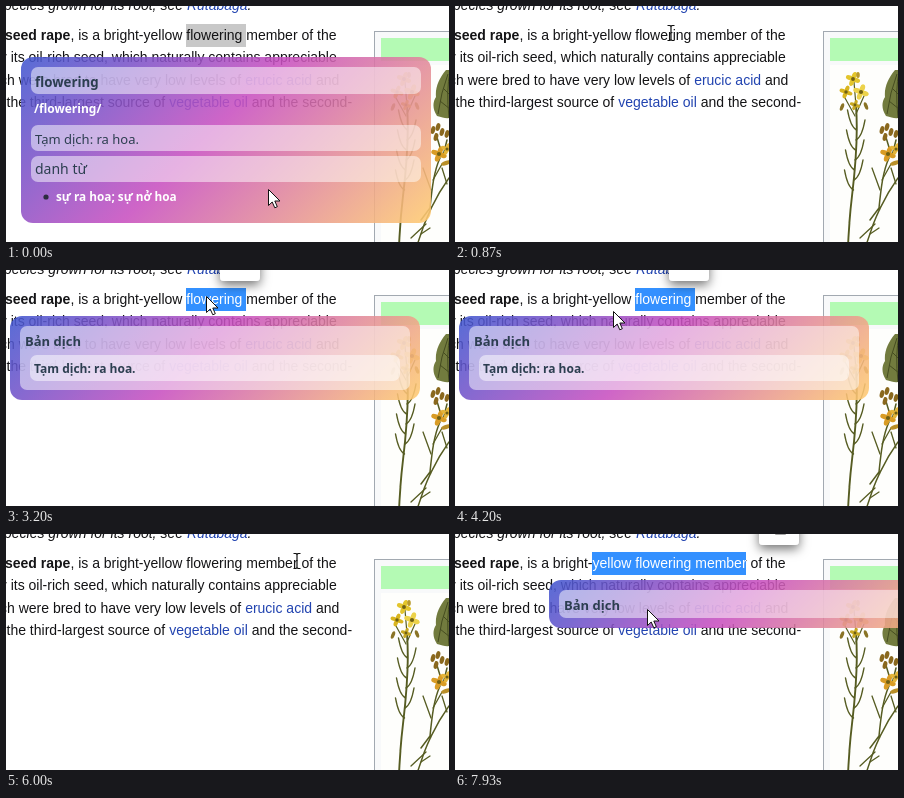
An HTML page for the animation above (8000 ms loop, 443 px wide and 236 px high).

```html
<!DOCTYPE html>
<html lang="en">
<head>
<meta charset="utf-8">
<title>Popup translator</title>
<style>
  html, body { margin: 0; width: 100%; height: 100%; overflow: hidden; background: #fff; }
  svg { display: block; width: 443px; height: 236px; }
  .page { font: 14px "Liberation Sans", Arial, sans-serif; fill: #141416; white-space: pre; }
  .link { fill: #2244b0; }
  .popup { font-family: "Noto Sans", "Open Sans", sans-serif; }
  .ink { fill: #2c3e50; }
  .stem { fill: none; stroke-linecap: round; }
</style>
</head>
<body>
<svg id="stage" viewBox="0 0 443 236" xmlns="http://www.w3.org/2000/svg">
  <defs>
    <filter id="soft" x="-75%" y="-75%" width="250%" height="250%">
      <feDropShadow dx="0" dy="4" stdDeviation="5.5" flood-opacity=".55"/>
    </filter>
    <clipPath id="selClip"><rect id="clipRect" y="18" height="23"/></clipPath>
  </defs>
  <rect width="443" height="236" fill="#fff"/>
  <g id="plant"></g>
  <g class="page">
    <text x="-9" y="4" font-style="italic">species grown for its root, see <tspan class="link">Rutabaga</tspan>.</text>
    <text x="-1" y="34"><tspan font-weight="bold">seed rape</tspan>, is a bright-yellow flowering member of the</text>
    <text x="-14" y="56">by its oil-rich seed, which naturally contains appreciable</text>
    <text x="-6" y="79">ch were bred to have very low levels of <tspan class="link">erucic acid</tspan> and</text>
    <text x="0.5" y="101">the third-largest source of <tspan class="link">vegetable oil</tspan> and the second-</text>
  </g>
  <g id="selection" class="page" clip-path="url(#selClip)">
    <rect id="highlight" width="443" height="60"/>
    <text id="selected" x="-1" y="34"><tspan font-weight="bold">seed rape</tspan>, is a bright-yellow flowering member of the</text>
  </g>
  <g id="button">
    <rect y="-28" width="40" height="39" rx="4" fill="#fff" filter="url(#soft)"/>
    <rect id="icon" x="16" y="-6" width="11" height="7" rx="1" fill="#222"/>
  </g>
  <g id="popups"></g>
  <path id="arrow" d="M.5 .5V16.5L4.2 13L6.8 18.8L9.3 17.7L6.8 12H12Z" fill="#fff" stroke="#111" stroke-linejoin="round"/>
  <path id="beam" d="M-3.5 -7.5H-1L0 -6.5L1 -7.5H3.5M0 -6.5V6.5M-3.5 7.5H-1L0 6.5L1 7.5H3.5" fill="none" stroke="#111" stroke-width="1.2"/>
</svg>
<script>
const LOOP = 8000, STEP = 1000 / 15;
const $ = id => document.getElementById(id);

// Botanical plate in the info box
const stem = (d, w = 1.2, color = '#565c22') =>
  `<path class="stem" d="${d}" stroke-width="${w}" stroke="${color}"/>`;
const petal = (x, y, angle, rx, ry, color) =>
  `<ellipse cx="${x}" cy="${y}" rx="${rx}" ry="${ry}" fill="${color}" transform="rotate(${angle} ${x} ${y})"/>`;
const flower = (x, y, r, color) => [20, 110, 200, 290].map(a => {
  const t = a * Math.PI / 180;
  return petal(x + Math.cos(t) * r * .65, y + Math.sin(t) * r * .65, a, r * .7, r * .42, color);
}).join('') + `<circle cx="${x}" cy="${y}" r="${r * .35}" fill="#6f6014"/>`;

function plant() {
  let s = `<rect x="368.5" y="25.5" width="90" height="230" fill="#f8f9fa" stroke="#a2a9b1"/>
    <rect x="375" y="32" width="70" height="23" fill="#b4fab4"/>
    <rect x="375" y="59" width="70" height="180" fill="#fefefc"/>`;
  s += stem('M401 100C403 125 400 165 397 190S394 222 393 240', 1.9);
  for (let i = 0; i < 7; i++) {
    const y = 124 + i * 10, side = i % 2 ? 1 : -1, x = 401.5 - i * .5;
    s += stem(`M${x} ${y}Q${x + side * 6} ${y - 3} ${x + side * 9} ${y - 20}`, 1.4);
  }
  s += stem('M400 110L390 92M401 108L409 90M401 100L399 76');
  s += flower(398, 73, 5.5, '#e3c52c') + flower(391, 86, 5, '#d9b51f') + flower(406, 86, 6, '#ecd24a') + flower(400, 99, 4, '#c9a922');
  s += petal(387, 101, 20, 1.8, 4, '#8a7426') + petal(411, 100, -20, 1.8, 4, '#8a7426') + petal(403, 69, 0, 1.8, 3, '#b8992b');
  s += `<path d="M440 64C433 72 429 82 430 91C426 97 427 104 431 110C438 112 443 114 446 110V64Z" fill="#727b3e"/>
    <path d="M442 68Q435 86 432 108M437 82L445 90M434 95L444 103M444 66Q440 84 443 112" fill="none" stroke="#454c20"/>`;
  s += stem('M434 152C428 165 426 182 424 202M443 172C430 190 419 212 411 240M430 128L436 148M441 134L437 150M424 202L415 214', 1.5);
  s += stem('M425 184L417 162M427 174L436 158M441 178L436 162M420 218L405 232M415 228L424 222', 1.3);
  for (const [x, y] of [[427, 124], [432, 121], [436, 126], [441, 128], [430, 131]]) s += petal(x, y, 15, 2.2, 4, '#8a681d');
  return s + flower(433, 148, 6, '#d99c25') + flower(441, 143, 4.5, '#e4b53a') + petal(440, 157, 70, 2.2, 5, '#b98f28');
}

// Translucent gradient cards
let gradients = 0;
const label = (x, y, size, weight, text, cls = 'ink') =>
  `<text x="${x}" y="${y}" font-size="${size}" font-weight="${weight}" class="${cls}" ${cls ? '' : 'fill="#fff"'}>${text}</text>`;
const field = (x, y, w, h) =>
  `<rect x="${x}" y="${y}" width="${w}" height="${h}" rx="7" fill="#fff" fill-opacity=".5"/>`;

function popup(id, x, y, h, content) {
  const w = 410, cx = w / 2, cy = h / 2, d = (w + h) / 4, grad = 'grad' + gradients++;
  return `<g id="${id}" class="popup" transform="translate(${x} ${y})">
    <linearGradient id="${grad}" gradientUnits="userSpaceOnUse" x1="${cx - d}" y1="${cy - d}" x2="${cx + d}" y2="${cy + d}">
      <stop stop-color="#4158d0"/><stop offset=".46" stop-color="#c850c0"/><stop offset="1" stop-color="#ffcc70"/>
    </linearGradient>
    <rect width="${w}" height="${h}" rx="12" fill="url(#${grad})" opacity=".88"/>${content}</g>`;
}

const heading = label(15, 30, 13, 700, 'Bản dịch');
$('plant').innerHTML = plant();
$('popups').innerHTML =
  popup('entry', 15, 51, 166,
    field(10, 10, 390, 27) + label(14, 30, 13.3, 700, 'flowering') +
    label(13, 56, 12, 600, '/flowering/', '') +
    field(10, 68, 390, 26) + label(14, 86.5, 13, 400, 'Tạm dịch: ra hoa.') +
    field(10, 99, 390, 26) + label(14, 117, 14, 400, 'danh từ') +
    '<circle cx="25" cy="140" r="2.6" fill="#2c2c40"/>' +
    label(35, 144, 11.8, 600, 'sự ra hoa; sự nở hoa', '')) +
  popup('loading', 4, 46, 48, field(10, 10, 390, 28) + heading) +
  popup('result', 4, 46, 84, field(10, 10, 390, 64) + heading +
    field(20, 39, 370, 26) + label(24, 56.5, 12, 600, 'Tạm dịch: ra hoa.'));

// time, x, y
const path = [
  [0, 262, 183], [70, 264, 186], [270, 271, 196], [670, 216, 27], [1000, 216, 27],
  [1130, 200, 27], [1270, 200, 26], [3340, 200, 26], [3870, 198, 44], [4000, 198, 44],
  [4200, 158, 41], [4400, 153, 40], [4870, 162, 33], [5270, 182, 30], [5400, 182, 30],
  [5530, 182, 29], [5610, 182, 29], [6000, 291, 27], [6270, 291, 26], [7070, 291, 26],
  [7330, 248, 45], [7930, 192, 75], [8000, 192, 75]
];
const clamp = v => Math.max(0, Math.min(1, v));
const within = (t, a, b) => t >= a && t < b;

function cursorAt(t) {
  const i = Math.max(1, path.findIndex(p => p[0] >= t));
  const [t0, x0, y0] = path[i - 1], [t1, x1, y1] = path[i];
  const u = clamp((t - t0) / (t1 - t0)), k = u * u * (3 - 2 * u);
  return [x0 + (x1 - x0) * k, y0 + (y1 - y0) * k];
}

function show(id, on) { $(id).style.display = on ? '' : 'none'; }
function set(id, attrs) { for (const k in attrs) $(id).setAttribute(k, attrs[k]); }

const CLOSE_ENTRY = 860, SELECT_WORD = 1260, CLOSE_WORD = 4460, SELECT_PHRASE = 6260;

function render(t) {
  const entry = t < CLOSE_ENTRY;
  const word = within(t, SELECT_WORD, CLOSE_WORD), phrase = t >= SELECT_PHRASE;
  const active = word || phrase;

  show('selection', entry || active);
  set('clipRect', { x: phrase ? 137 : 180, width: phrase ? 154 : 60 });
  set('highlight', { fill: entry ? '#c8c8c8' : '#3390ff' });
  $('selected').style.fill = entry ? '' : '#fff';

  show('button', active);
  set('button', {
    transform: `translate(${phrase ? 304 : 214} 0)`,
    opacity: clamp((t - (phrase ? SELECT_PHRASE + 60 : SELECT_WORD + 120)) / (phrase ? 200 : 330))
  });
  show('icon', phrase);
  set('icon', { opacity: 1 - .6 * clamp((t - 7400) / 200) });

  show('entry', entry);
  show('loading', within(t, 2190, 3190) || t >= 7120);
  set('loading', { transform: `translate(${phrase ? 94 : 4} 46)` });
  show('result', within(t, 3190, CLOSE_WORD));

  const [x, y] = cursorAt(t).map(Math.round);
  const arrow = active || (entry && y > 50);
  show('arrow', arrow);
  show('beam', !arrow);
  set(arrow ? 'arrow' : 'beam', { transform: `translate(${x} ${y})` });
}

function tick(now) {
  const t = now % LOOP;
  render(Math.floor(t / STEP + .05) * STEP);
  requestAnimationFrame(tick);
}
render(0);
requestAnimationFrame(tick);
</script>
</body>
</html>
```
